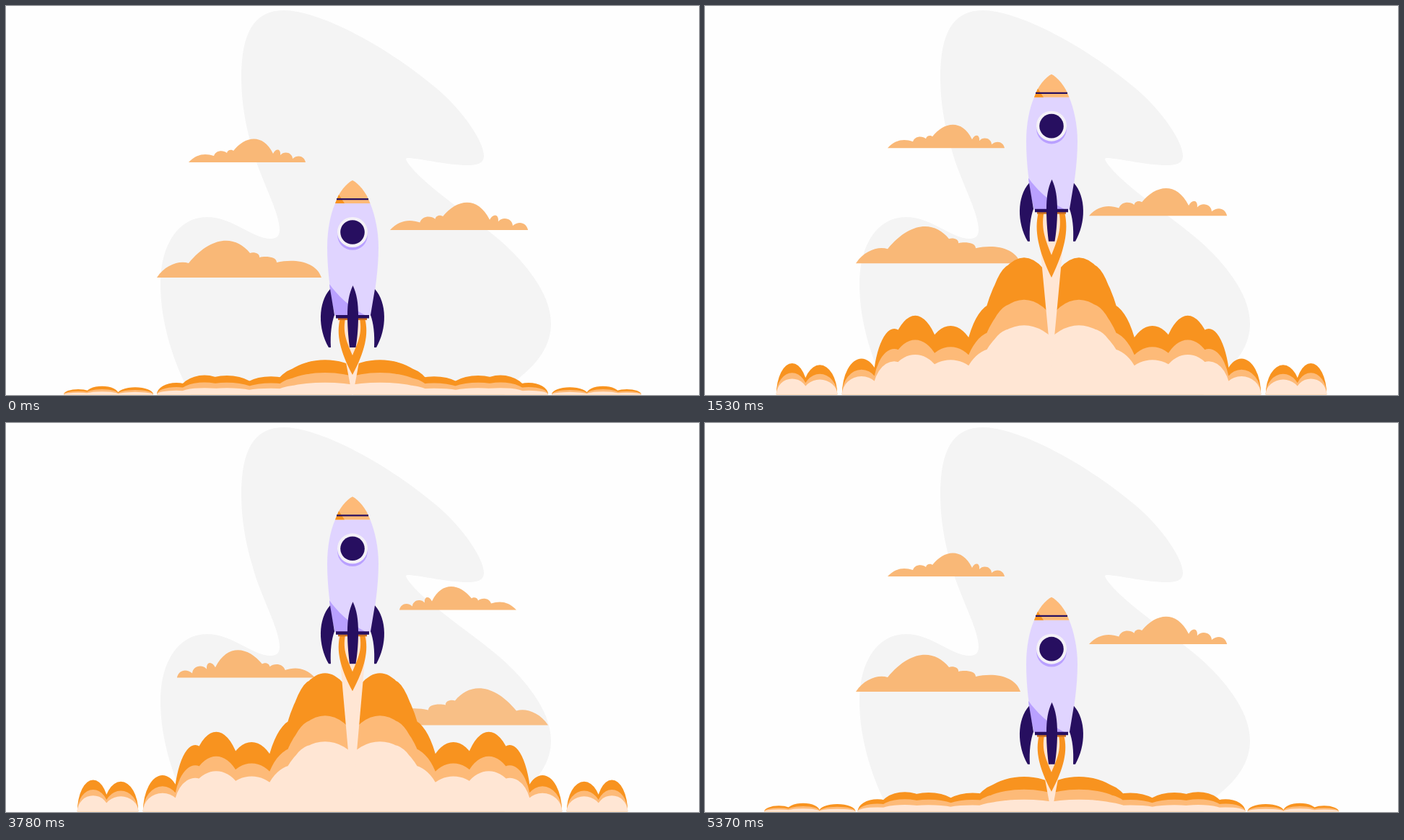
Recreate the animation shown at these times as an HTML page with a canvas. Size 960 by 540 pixels, loop 5400 ms.

```html
<!DOCTYPE html>
<html lang="en">
<head>
<meta charset="utf-8">
<title>Rocket launch</title>
<style>
html, body { margin: 0; width: 100%; height: 100%; overflow: hidden; background: #fefefe; }
canvas { display: block; }
</style>
</head>
<body>
<canvas id="stage" width="960" height="540"></canvas>
<script>
const ctx = document.getElementById('stage').getContext('2d');
const LOOP = 5400, STEP = 30, GROUND = 539.3;
const DARK = '#270f60', ORANGE = '#f8931f', PEACH = '#fdba78', PALE = '#ffe6d4', LILAC = '#b9a0ff';

// Interpolates flat [x, y, x, y, ...] keys, with straight or smooth segments.
function track(keys, x, smooth) {
  const n = keys.length / 2, X = i => keys[2 * i], Y = i => keys[2 * i + 1];
  if (x <= X(0)) return Y(0);
  if (x >= X(n - 1)) return Y(n - 1);
  let i = 0;
  while (x > X(i + 1)) i++;
  const d = X(i + 1) - X(i), p = (x - X(i)) / d;
  if (!smooth) return Y(i) + (Y(i + 1) - Y(i)) * p;
  const slope = j => j < 1 || j > n - 2 ? 0 : (Y(j + 1) - Y(j - 1)) / (X(j + 1) - X(j - 1));
  const q = 1 - p;
  return q * q * (1 + 2 * p) * Y(i) + p * p * (3 - 2 * p) * Y(i + 1)
    + d * p * q * (q * slope(i) - p * slope(i + 1));
}

const clamp = v => Math.max(0, Math.min(1, v));

function fill(path, color, rule = 'nonzero') {
  ctx.fillStyle = color;
  ctx.fill(path instanceof Path2D ? path : new Path2D(path), rule);
}

function disc(x, y, r, color) {
  ctx.fillStyle = color;
  ctx.beginPath();
  ctx.arc(x, y, r, 0, 7);
  ctx.fill();
}

// Motion over the loop
const fall = [2700, 1, 2910, .994, 3450, .94, 3780, .857, 4650, .463, 5025, .164, 5370, .002, 5400, 0];
const rocketRise = [0, 0, 450, .38, 900, .712, 1710, .942, 2190, .982, ...fall];
const smokeRise = [0, 0, 450, .223, 900, .566, 1710, .905, 2190, .97, ...fall];
const beamTip = [0, 543, 900, 478, 2190, 541, 2910, 556, 3780, 524, 4650, 502, 5370, 543];
const flameLength = [0, 1, 900, 1.2, 2190, 1.115, 2910, 1];
const flameWidth = [900, 1, 2190, 1.125, 2910, 1];

const blob = new Path2D('M326 100C326 40 342 6 385 6C430 6 520 50 596 114C636 148 662 190 662 208' +
  'C662 219 652 221 638 221C612 221 570 211 557 211C553 211 553 213 559 221' +
  'C590 260 668 305 705 345C738 380 755 412 755 441C755 470 738 495 710 517L690 540H256' +
  'C232 495 214 440 214 386C214 330 240 293 278 293C315 293 340 323 367 323' +
  'C376 323 379 318 379 311C379 285 352 240 341 197C331 165 326 130 326 100Z');

// Clouds
const puffy = new Path2D('M0 0C11 -12 23 -13 35 -9C38 -17 48 -17 53 -13C54 -18 60 -18 62 -16' +
  'C77 -35 102 -42 117 -12C121 -20 128 -19 127 -10C133 -17 144 -13 144 -5C151 -11 160 -9 162 0Z');
const wide = new Path2D('M0 0C12 -18 31 -24 44 -20C76 -59 109 -59 129 -34C135 -36 143 -33 142 -28' +
  'C151 -30 166 -29 166 -21C191 -27 221 -22 228 0Z');
const clouds = [
  { path: puffy, x: 253, dy: 0, size: 1, show: 92, hide: 327 },
  { path: puffy, x: 532, dy: 94, size: 1.18, show: 131, hide: 373 },
  { path: wide, x: 209, dy: 160, size: 1, show: 175, hide: 412 }
];
const groups = [
  { keys: [-1600, 4, -750, 117, 0, 217, 900, 333.5, 1400, 398] },
  { keys: [100, 6, 900, 112.5, 2190, 286, 2910, 381, 3200, 419] },
  { keys: [1800, -8, 2190, 45, 2910, 142, 3780, 259.5, 4650, 376, 4900, 409], mirror: true }
];

function drawClouds(t) {
  groups.forEach((group, i) => {
    const top = track(group.keys, i === 0 && t > 3500 ? t - LOOP : t);
    for (const c of clouds) {
      const y = top + c.dy;
      const alpha = Math.min(clamp((y - c.show) / 61), clamp((c.hide + 61 - y) / 61));
      if (!alpha) continue;
      ctx.save();
      ctx.globalAlpha = alpha;
      if (group.mirror) { ctx.translate(960, 0); ctx.scale(-1, 1); }
      ctx.translate(c.x, y);
      ctx.scale(c.size, c.size);
      fill(c.path, '#f9b877');
      ctx.restore();
    }
  });
}

// Smoke: puffs drift outwards along one track; height and radius follow from x.
const puffX = [-1, 440, 0, 427, .667, 415, 1, 404, 1.667, 367, 2, 344, 2.667, 306, 3, 293, 3.667, 275,
  4, 265, 4.667, 236, 5, 221, 5.667, 179, 6, 162, 6.667, 133, 7, 123, 7.667, 100, 8, 88];
const puffHeight = [88, 0, 100, .153, 104, .175, 119, .226, 133, .243, 162, .213, 179, .208, 212, .244,
  235, .333, 262, .48, 275, .556, 289, .58, 306, .55, 335, .498, 366, .52, 380, .56, 397, .645,
  404, .69, 415, .82, 427, .97, 442, 1];
const puffRadius = [88, 18, 100, 20, 133, 23, 179, 25, 212, 27, 235, 27, 262, 30, 275, 37, 306, 45];

function drawSmoke(t) {
  const phase = ((t + LOOP - 150) / 450) % 1;
  const height = 48 + 168 * track(smokeRise, t, true);
  const puffs = [[442, 1, 68]];
  for (let k = -1; k < 8; k++) {
    const x = track(puffX, k + phase);
    puffs.push([x, track(puffHeight, x), track(puffRadius, x)]);
  }
  const layers = [[ORANGE, height], [PEACH, .714 * height - 4], [PALE, .56 * height - 10.4]];
  for (const [color, h] of layers) {
    const shape = new Path2D();
    for (const [x, part, r] of puffs) {
      for (const cx of [x, 960 - x]) {
        shape.moveTo(cx - r, GROUND);
        shape.ellipse(cx, GROUND, r, h * part, 0, Math.PI, 2 * Math.PI);
        shape.closePath();
      }
    }
    fill(shape, color);
  }
}

// Rocket, drawn at its resting place
const fin = 'M449 393C432 412 432 448 447 474H450C449 455 451 440 455 429Z';
const flame = new Path2D('M463 434C457 455 463 480 480 512C497 480 503 455 497 434Z' +
  'M470 434C466 455 473 468 480 485C487 468 494 455 490 434Z');

function drawRocket(t) {
  const lift = 163 * track(rocketRise, t, true);
  const base = 436 - lift;
  fill(`M460 ${base}H500L480 ${track(beamTip, t, true)}Z`, PALE);

  ctx.save();
  ctx.translate(0, -lift);

  ctx.save();
  ctx.translate(480, 434);
  ctx.scale(track(flameWidth, t), track(flameLength, t));
  ctx.translate(-480, -434);
  fill(flame, ORANGE, 'evenodd');
  ctx.restore();

  fill('M456 274H504.5C511 290 516 312 516 335C516 365 511 400 505 430H456C449 400 445 365 445 335C445 312 449 290 456 274Z', '#e0d4ff');
  fill('M448 386C458 400 475 418 499 430H456C452 415 449 400 448 386Z', LILAC);
  fill('M480 242C488 246 499 258 504.5 274H456C461 258 472 246 480 242Z', PEACH);
  fill('M456 274L461 262L469 274Z', ORANGE);
  fill('M458 267H502V269.3H458Z', DARK);

  disc(480, 318, 20.8, LILAC);
  disc(480, 314, 21, '#f4f1f7');
  disc(480, 314, 16.8, DARK);

  fill('M460 433H500V436H460Z', '#c96f22');
  fill('M457 429H503V433.5H457Z', DARK);
  fill(fin, DARK);
  ctx.save();
  ctx.translate(960, 0);
  ctx.scale(-1, 1);
  fill(fin, DARK);
  ctx.restore();
  fill('M480.5 388C475 400 473 412 473 430C473 450 475 465 476 474H484.5C486 465 488 450 488 430C488 412 486 400 480.5 388Z', DARK);
  ctx.restore();
}

function draw(now) {
  const t = Math.floor(now % LOOP / STEP) * STEP;
  ctx.fillStyle = '#fefefe';
  ctx.fillRect(0, 0, 960, 540);
  fill(blob, '#f4f4f4');
  drawClouds(t);
  drawSmoke(t);
  drawRocket(t);
}

const start = performance.now();
function tick() {
  draw(performance.now() - start);
  requestAnimationFrame(tick);
}
tick();
</script>
</body>
</html>
```
